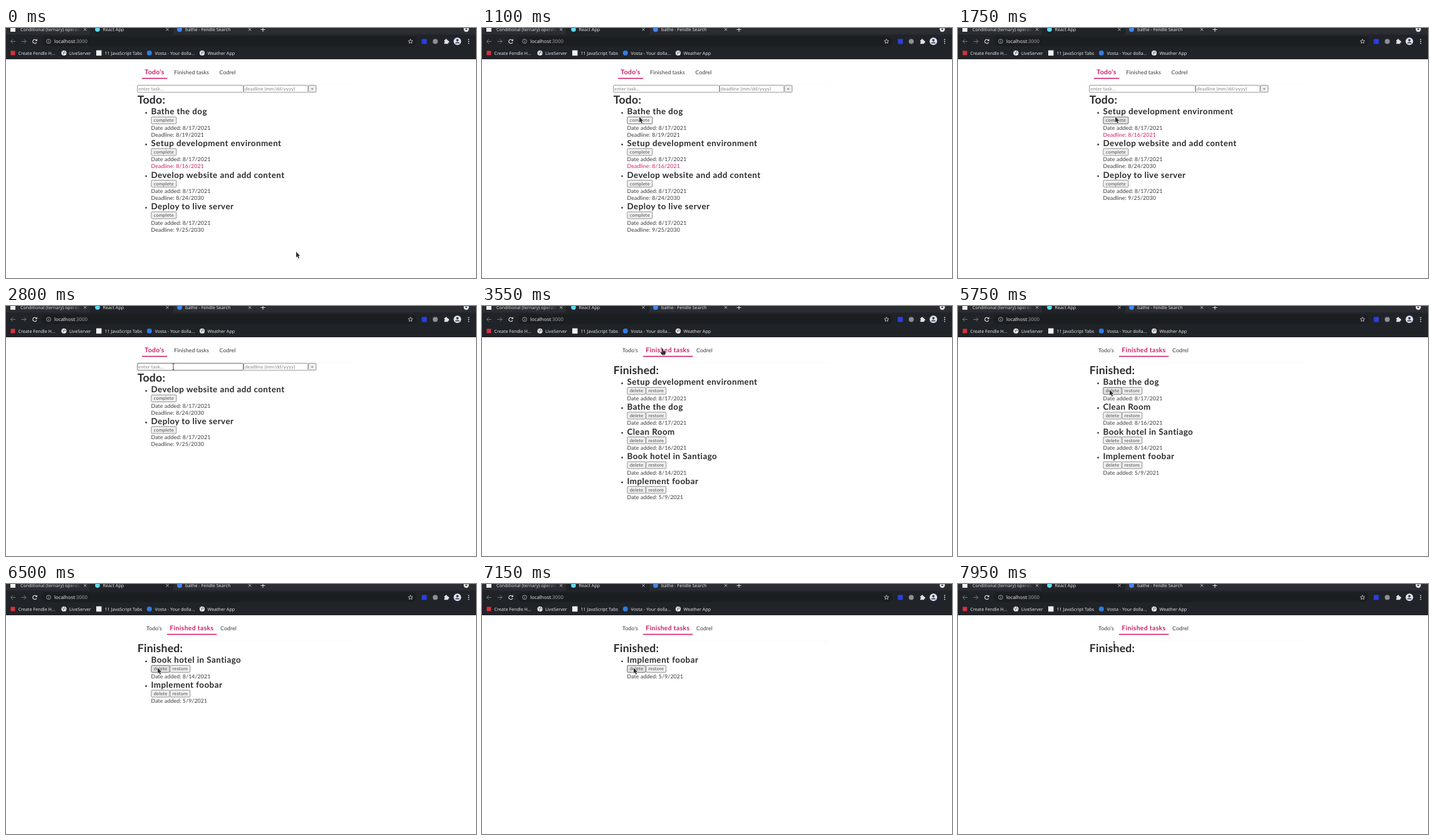
Write an HTML page with a canvas that moves like this. It is 750 px wide and 400 px high and loops after 8000 ms.

```html
<!DOCTYPE html>
<html lang="en">
<head>
<meta charset="utf-8">
<title>Todo app</title>
<style>
  html, body { margin: 0; width: 100%; height: 100%; overflow: hidden; background: #fff; }
  canvas { display: block; }
</style>
</head>
<body>
<canvas id="stage" width="750" height="400"></canvas>
<script>
const ctx = document.getElementById('stage').getContext('2d');
const LOOP = 8000, STEP = 50;
const PINK = '#cf1d66', INK = '#2b2b2e', BODY = '#39393c';
const PAGE_FONT = 'Lato, "Open Sans", sans-serif';
const UI_FONT = '"Noto Sans", "Open Sans", sans-serif';

const todos = [
  ['Bathe the dog', '8/17/2021', '8/19/2021'],
  ['Setup development environment', '8/17/2021', '8/16/2021', true],
  ['Develop website and add content', '8/17/2021', '8/24/2030'],
  ['Deploy to live server', '8/17/2021', '9/25/2030']
];
const finished = [
  ['Setup development environment', '8/17/2021'],
  ['Bathe the dog', '8/17/2021'],
  ['Clean Room', '8/16/2021'],
  ['Book hotel in Santiago', '8/14/2021'],
  ['Implement foobar', '5/9/2021']
];

const SWITCH = 3550;
const completeTimes = [1150, 2200];
const deleteTimes = [5500, 5950, 6450, 7000, 7700];

// Pointer path: time, x, y
const path = [
  [0, 463, 358], [50, 425, 318], [150, 262, 110], [250, 240, 67],
  [350, 240, 67], [400, 244, 46], [550, 262, 208], [650, 251, 142],
  [2650, 251, 142], [2800, 267, 97], [3000, 281, 74], [3200, 288, 68],
  [3600, 288, 68], [3950, 284, 110], [4350, 278, 150],
  [4600, 278, 150], [4800, 249, 136], [5000, 242, 134],
  [7700, 242, 134], [7950, 249, 97], [8000, 249, 97]
];

const passed = (times, t) => times.filter(v => t >= v).length;

function pointerAt(t) {
  const i = Math.max(1, path.findIndex(p => p[0] > t));
  const [t0, x0, y0] = path[i - 1], [t1, x1, y1] = path[i];
  const u = (t - t0) / (t1 - t0);
  return { x: x0 + (x1 - x0) * u, y: y0 + (y1 - y0) * u };
}

function inside(p, x, y, w, h) {
  return p.x >= x && p.x < x + w && p.y >= y && p.y < y + h;
}

function text(str, x, y, size, color, weight = 400, spacing = 0.1, family = PAGE_FONT) {
  ctx.font = `${weight} ${size}px ${family}`;
  ctx.letterSpacing = spacing + 'px';
  ctx.fillStyle = color;
  ctx.fillText(str, x, y);
}

const ui = (str, x, y, color = '#e3e5e8', size = 7.15) => text(str, x, y, size, color, 400, 0, UI_FONT);

function rect(x, y, w, h, color) {
  ctx.fillStyle = color;
  ctx.fillRect(x, y, w, h);
}

function disc(x, y, r, color) {
  ctx.fillStyle = color;
  ctx.beginPath();
  ctx.arc(x, y, r, 0, Math.PI * 2);
  ctx.fill();
}

function pill(x, y, w, h, r, color) {
  ctx.fillStyle = color;
  ctx.beginPath();
  ctx.roundRect(x, y, w, h, r);
  ctx.fill();
}

function box(x, y, w, h, fill, border) {
  pill(x, y, w, h, 1.5, fill);
  ctx.strokeStyle = border;
  ctx.lineWidth = 0.8;
  ctx.beginPath();
  ctx.roundRect(x + 0.4, y + 0.4, w - 0.8, h - 0.8, 1.3);
  ctx.stroke();
}

// Strokes each list of x, y pairs as a polyline
function lines(color, width, ...lists) {
  ctx.strokeStyle = color;
  ctx.lineWidth = width;
  ctx.beginPath();
  for (const l of lists)
    for (let i = 0; i < l.length; i += 2) ctx[i ? 'lineTo' : 'moveTo'](l[i], l[i + 1]);
  ctx.stroke();
}

function ring(x, y, r, color, width, from = 0, to = Math.PI * 2) {
  ctx.strokeStyle = color;
  ctx.lineWidth = width;
  ctx.beginPath();
  ctx.arc(x, y, r, from, to);
  ctx.stroke();
}

function polygon(points, fill) {
  ctx.fillStyle = fill;
  ctx.beginPath();
  points.forEach(([x, y]) => ctx.lineTo(x, y));
  ctx.closePath();
  ctx.fill();
}

const cross = (x, y) => lines('#d5d8dc', 0.9, [x - 2, y - 2, x + 2, y + 2], [x + 2, y - 2, x - 2, y + 2]);

function globe(x, y) {
  disc(x, y, 4.1, '#f0f1f3');
  lines('#3a3e44', 0.9, [x - 2.5, y - 2, x - 0.3, y - 0.6, x - 0.8, y + 2.5], [x + 1, y - 3, x + 1.3, y - 0.8, x + 3, y + 0.5]);
}

function star(x, y) {
  const pts = [];
  for (let i = 0; i <= 10; i++) {
    const a = -Math.PI / 2 + i * Math.PI / 5, r = i % 2 ? 1.7 : 3.8;
    pts.push(x + r * Math.cos(a), y + r * Math.sin(a));
  }
  lines('#d8dadd', 0.8, pts);
}

function drawTabs() {
  rect(0, 0, 750, 50, '#202327');
  rect(0, 0, 750, 10.5, '#2a2d32');
  rect(134, 0, 133, 11, '#202327');
  rect(7, 0, 8, 6, '#f2f2f2');
  const fade = ctx.createLinearGradient(100, 0, 119, 0);
  fade.addColorStop(0, '#d8dbde');
  fade.addColorStop(1, 'rgba(216,219,222,0.1)');
  ctx.save();
  ctx.beginPath();
  ctx.rect(0, 0, 119, 11);
  ctx.clip();
  ui('Conditional (ternary) operator', 23, 5, fade);
  ctx.restore();
  disc(146, 2.3, 3.8, '#61dafb');
  ui('React App', 154.5, 5);
  disc(277, 2.3, 4, '#4285f4');
  ui('bathe - Fendle Search', 286, 5);
  [126.2, 257.5, 389].forEach(x => cross(x, 2.4));
  lines('#e3e5e8', 1, [406.5, 2.5, 413.5, 2.5], [410, -1, 410, 6]);
  disc(734.5, 2, 4.2, '#e3e5e8');
  polygon([[732.4, 1], [736.6, 1], [734.5, 3.6]], '#2a2d32');
}

function drawToolbar() {
  pill(57, 13.5, 598, 15.5, 7.7, '#1b1e21');
  lines('#777c82', 1, [15, 21.5, 7.5, 21.5], [11, 18, 7.5, 21.5, 11, 25]);
  lines('#777c82', 1, [24.5, 21.5, 32, 21.5], [28.5, 18, 32, 21.5, 28.5, 25]);
  ring(46, 21.5, 3.1, '#e6e8ea', 1.1, 0.4, 5.5);
  polygon([[46.5, 20.8], [49.8, 20.8], [49.8, 17.5]], '#e6e8ea');
  ring(68, 21.3, 3.4, '#b4b8bd', 0.8);
  lines('#b4b8bd', 0.9, [68, 20.8, 68, 23.2], [68, 19.2, 68, 20]);
  ui('localhost', 77, 24, '#e3e5e8', 7.8);
  const w = ctx.measureText('localhost').width;
  ui(':3000', 77 + w, 24, '#9a9fa5', 7.8);
  star(645.5, 21.5);
  rect(663.5, 17.5, 8, 8, '#2a3fe0');
  disc(685, 21.5, 4, '#8d8f92');
  rect(699.3, 19.3, 6.2, 6, '#e3e5e8');
  disc(702.3, 18.9, 1.4, '#e3e5e8');
  disc(705.8, 22.2, 1.4, '#e3e5e8');
  disc(699.4, 22.3, 1, '#202327');
  disc(720.3, 21.3, 6, '#dfe3ee');
  disc(720.3, 19.5, 1.9, '#3b4358');
  ctx.fillStyle = '#3b4358';
  ctx.beginPath();
  ctx.ellipse(720.3, 24.6, 3.6, 2, 0, Math.PI, 0);
  ctx.fill();
  [18.4, 21.5, 24.6].forEach(y => disc(738.3, y, 0.9, '#e3e5e8'));
}

function drawBookmarks() {
  rect(7.5, 36.5, 7, 7, '#d9303e');
  globe(92.5, 40);
  rect(144, 35.7, 8.5, 8.5, '#f2f2f2');
  disc(228.8, 40, 4, '#2f7de1');
  globe(313, 40);
  ui('Create Fendle H...', 19.5, 42.5);
  ui('LiveServer', 101, 42.5);
  ui('11 JavaScript Tabs', 157.5, 42.5);
  ui('Vosta - Your dolla...', 237.5, 42.5);
  ui('Weather App', 321.5, 42.5);
}

function drawNav(onTodos) {
  const active = (str, x) => text(str, x, 73.7, 10.4, PINK, 700, 0.35);
  const link = (str, x) => text(str, x, 73.7, 8.8, BODY);
  rect(198, 90.6, 354, 0.8, '#f5f5f5');
  if (onTodos) {
    active("Todo's", 221.3);
    link('Finished tasks', 268.3);
    link('Codrel', 340.5);
    rect(217, 79.8, 40.3, 1.6, PINK);
  } else {
    link("Todo's", 224);
    active('Finished tasks', 261.3);
    link('Codrel', 342);
    rect(257, 79.8, 79.3, 1.6, PINK);
  }
}

function button(label, x, y, w, p, pressed) {
  const hover = inside(p, x, y, w, 11.8);
  const fill = pressed && hover ? '#f5f5f5' : hover ? '#e3e3e3' : '#efefef';
  box(x, y, w, 11.8, fill, hover ? '#505050' : '#7a7a7a');
  ctx.textAlign = 'center';
  text(label, x + w / 2, y + 8.5, 7.5, '#4a4a4c', 400, 0.2);
  ctx.textAlign = 'left';
}

function field(hint, x, w, p) {
  const hover = inside(p, x, 91.3, w, 12);
  box(x, 91.3, w, 12, '#fff', hover ? '#444' : '#7a7a7a');
  text(hint, x + 2, 99.8, 7.5, '#838383', 400, 0.2);
}

function heading(str, y) {
  disc(223.6, y - 2.6, 1.35, INK);
  text(str, 231.5, y, 13.4, INK, 700, 0.45);
}

function drawTodos(t, p) {
  field('enter task...', 209.3, 169.7, p);
  field('deadline (mm/dd/yyyy)', 379, 103.3, p);
  button('+', 482.3, 91.3, 13, p);
  text('Todo:', 209.8, 121, 17.7, INK, 700, 0.2);
  const pressed = completeTimes.some(c => t >= c - STEP && t < c);
  todos.slice(passed(completeTimes, t)).forEach(([name, added, due, late], i) => {
    const y = 138.4 + i * 50.6;
    heading(name, y);
    button('complete', 231.5, y + 3.5, 40.7, p, pressed);
    text('Date added: ' + added, 231.5, y + 24.3, 8.8, BODY);
    text('Deadline: ' + due, 231.5, y + 35.3, 8.8, late ? PINK : BODY);
  });
}

function drawFinished(t, p) {
  text('Finished:', 209.8, 109, 17.7, INK, 700, 0.2);
  const pressed = deleteTimes.some(d => t >= d - STEP && t < d);
  finished.slice(passed(deleteTimes, t)).forEach(([name, added], i) => {
    const y = 126.4 + i * 39.6;
    heading(name, y);
    button('delete', 231.5, y + 3.5, 30, p, pressed);
    button('restore', 261.5, y + 3.5, 32.6, p);
    text('Date added: ' + added, 231.5, y + 24.3, 8.8, BODY);
  });
}

function pointerShape(t, p) {
  if (inside(p, 217, 62, 151, 19)) return 'hand';
  if (t < SWITCH) return inside(p, 209, 91, 273, 12) ? 'beam' : 'arrow';
  return inside(p, 209, 92, 75, 20) ? 'beam' : 'arrow';
}

function drawPointer(shape, { x, y }) {
  ctx.save();
  ctx.translate(x, y);
  ctx.lineJoin = 'round';
  if (shape === 'beam') {
    lines('#333', 0.9, [0, -4.5, 0, 4.5], [-1.6, -5, 0, -4.5, 1.6, -5], [-1.6, 5, 0, 4.5, 1.6, 5]);
  } else {
    const pts = shape === 'hand'
      ? [[-0.9, 0], [0.9, 0], [1.1, 3.5], [5, 4.6], [5, 7.5], [3.8, 10.2], [-0.8, 10.2], [-3.6, 6.2], [-2.7, 5.3], [-0.9, 6.6]]
      : [[0, 0], [0, 9], [2, 7.2], [3.6, 10.8], [5.1, 10.1], [3.6, 6.7], [6.3, 6.5]];
    lines('#f4f4f4', 1.3, [...pts, pts[0]].flat());
    polygon(pts, '#323234');
  }
  ctx.restore();
}

function draw(now) {
  const t = Math.floor((now % LOOP) / STEP) * STEP;
  const p = pointerAt(t), onTodos = t < SWITCH;
  ctx.textRendering = 'geometricPrecision';
  rect(0, 0, 750, 400, '#fff');
  drawTabs();
  drawToolbar();
  drawBookmarks();
  drawNav(onTodos);
  (onTodos ? drawTodos : drawFinished)(t, p);
  drawPointer(pointerShape(t, p), p);
}

let start;
function tick(now) {
  start ??= now;
  draw(now - start);
  requestAnimationFrame(tick);
}
requestAnimationFrame(tick);
</script>
</body>
</html>
```
